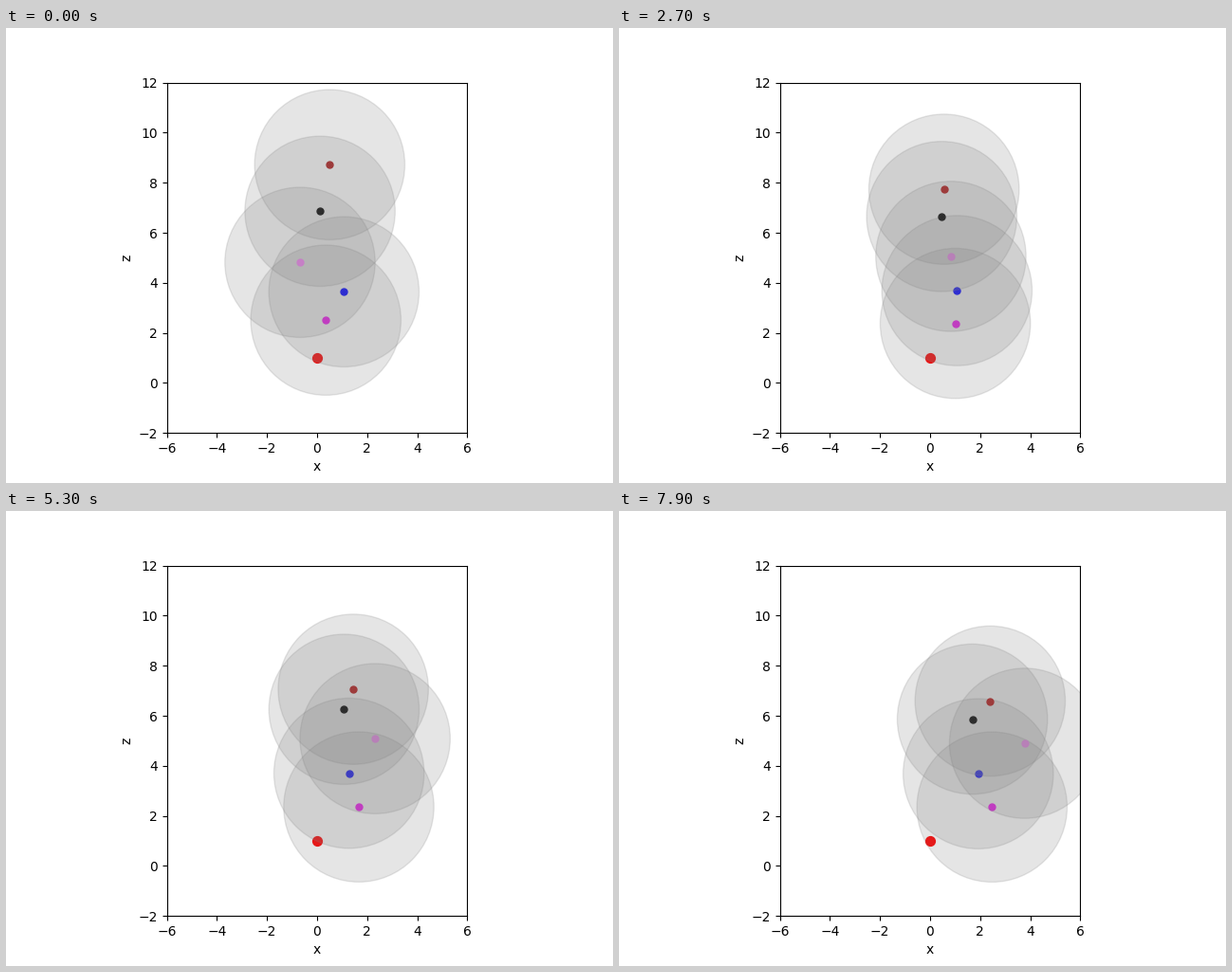
These frames come from a looping animation (640 by 480 pixels, 8 s). A matplotlib script:

```python
import numpy as np
import matplotlib.pyplot as plt
from matplotlib.animation import FuncAnimation
from matplotlib.patches import Circle

FRAMES = 80
REACH = 3.0


def turn(start, speed, gain, when, width):
    """Steady drift whose speed changes by gain around a given time."""
    return lambda t: (start + speed * t
                      + gain * width * np.log1p(np.exp((t - when) / width)))


def settle(start, change, tau):
    """Exponential approach to start + change."""
    return lambda t: start + change * (1 - np.exp(-t / tau))


def arc(start, speed, accel):
    """Constant acceleration."""
    return lambda t: start + speed * t + accel * t * t


# Motion in x and z, from the bottom layer to the top one.
MOTION = {
    "magenta": (turn(0.35, 0.0253, 0.0094, 62, 3), settle(2.508, -0.155, 14)),
    "blue": (turn(1.072, -0.0005, 0.0295, 48, 8), arc(3.64, 0.0025, -2.5e-5)),
    "violet": (arc(-0.682, 0.0587, -2e-5), arc(4.818, 0.0133, -1.57e-4)),
    "black": (turn(0.117, 0.0045, 0.0191, 14, 3),
              turn(6.86, -0.002, -0.0131, 14, 3)),
    "brown": (turn(0.504, -0.0005, 0.0372, 26, 2.5), settle(8.72, -3.2, 71)),
}

fig, ax = plt.subplots(figsize=(6.4, 4.8), dpi=100)
ax.set_aspect("equal")
ax.set_xlim(-6, 6)
ax.set_ylim(-2, 12)
ax.set_xlabel("x")
ax.set_ylabel("z")

ax.scatter(0, 1, s=50, color="red")
particles = []
for color, motion in MOTION.items():
    dot = ax.scatter(0, 0, s=25, color=color)
    halo = ax.add_patch(Circle((0, 0), REACH, color="gray", alpha=0.2))
    particles.append((dot, halo, motion))


def update(frame):
    step = max(frame - 1, 0)
    for dot, halo, (x, z) in particles:
        halo.center = x(step), z(step)
        dot.set_offsets([halo.center])


anim = FuncAnimation(fig, update, frames=FRAMES, interval=100,
                     repeat=True, repeat_delay=0, blit=False)
plt.show()
```
